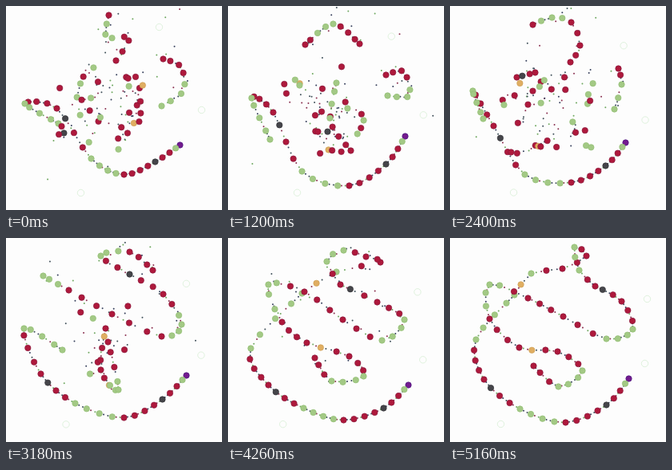
These frames come from a looping animation (270x256 px, 5.22 s). An HTML page with a canvas:

```html
<!DOCTYPE html>
<html lang="en">
<head>
<meta charset="utf-8">
<title>Folding chain</title>
<style>
html, body { margin: 0; width: 100%; height: 100%; overflow: hidden; background: #fdfdfd; }
canvas { display: block; }
</style>
</head>
<body>
<canvas width="270" height="256"></canvas>
<script>
const ctx = document.querySelector('canvas').getContext('2d');
const LOOP = 5220, STEP = 60, FOLDED = 5160;
const KINDS = 'pgrrdrrrrggggrrdrrrrgggggogrrrrrgggrrdrrrrggggrrrrrrrggggrrrrorrrrggggrrr';
const FILL = { p: '#731b8e', g: '#a3c985', r: '#ae193c', d: '#45454a', o: '#e0ae62' };
const EDGE = { p: '#4c1a80', g: '#93bf74', r: '#8a1b3e', d: '#35353a', o: '#cfa055' };
const DOTS = ['#37405c', '#6fa860', '#8a3050', '#40505a'];
const poses = [];

const mix = (a, b, u) => a + (b - a) * u;
const hash = n => { const s = Math.sin(n * 127.1 + 3.7) * 43758.5453; return s - Math.floor(s); };

function spline(a, b, c, d, u) {
  return b + u * (c - a + u * (2 * a - 5 * b + 4 * c - d + u * (3 * (b - c) + d - a))) / 2;
}

// A strand is [first bead, last bead, x, y, x, y, ...]: beads spread along a curve through key points.
// Beads that belong to no strand float loose near the middle.
function pose(time, ...strands) {
  const beads = [...KINDS].map((_, i) => {
    const seed = i + time;
    return [65 + 115 * hash(seed), 75 + 110 * hash(seed + 0.5)];
  });
  for (const [first, last, ...xy] of strands) {
    const end = xy.length / 2 - 1;
    for (let i = first; i <= last; i++) {
      const s = (i - first) / (last - first) * end, k = Math.min(Math.floor(s), end - 1);
      beads[i] = [0, 1].map(axis => {
        const at = j => xy[2 * Math.max(0, Math.min(end, j)) + axis];
        return spline(at(k - 1), at(k), at(k + 1), at(k + 2), s - k);
      });
    }
  }
  poses.push({ time, beads });
}

pose(0,
  [0, 24, 217,174, 186,195, 147,211, 106,191, 63,128, 23,122, 65,147],
  [28, 35, 137,68, 153,40, 125,38, 128,11],
  [38, 45, 196,66, 218,76, 221,106, 194,125]);

pose(1200,
  [0, 24, 221,163, 197,198, 151,225, 92,207, 56,133, 29,115, 52,167],
  [28, 36, 164,47, 131,22, 96,48],
  [38, 45, 197,86, 219,82, 226,112, 199,112],
  [48, 55, 153,181, 128,145, 135,96]);

pose(2400,
  [0, 24, 219,171, 194,200, 151,221, 93,211, 54,150, 28,106, 41,141],
  [27, 35, 150,70, 162,49, 151,20, 127,14, 103,23],
  [36, 39, 83,89, 106,83],
  [40, 44, 210,78, 214,98, 205,129]);

pose(3180,
  [0, 24, 225,172, 195,202, 147,225, 86,207, 43,170, 22,113, 70,140],
  [28, 55, 183,40, 154,17, 118,22, 154,45, 196,70, 219,108, 194,123, 132,95, 78,65, 46,47],
  [60, 72, 124,113, 118,165, 140,190, 127,130]);

pose(4260,
  [0, 24, 225,184, 194,213, 144,228, 94,213, 50,184, 28,138, 92,69],
  [24, 36, 92,69, 135,42, 190,30, 172,23, 144,15, 123,29, 140,58],
  [36, 72, 140,58, 186,80, 220,102, 192,128, 143,102, 95,67, 50,58,
    67,105, 98,131, 151,148, 169,173, 129,179, 108,150]);

pose(FOLDED,
  [0, 24, 223,176, 195,209, 144,231, 87,214, 42,177, 32,127, 80,71],
  [24, 36, 80,71, 101,44, 140,38, 170,22, 155,11, 161,40, 181,60],
  [36, 72, 181,60, 214,79, 228,114, 195,126, 141,98, 97,75, 49,58,
    49,101, 86,137, 134,142, 165,166, 135,186, 104,160]);

function disc(x, y, r, fill, edge) {
  ctx.beginPath();
  ctx.arc(x, y, r, 0, 7);
  if (fill) { ctx.fillStyle = fill; ctx.fill(); }
  if (edge) { ctx.strokeStyle = edge; ctx.stroke(); }
}

function draw(t) {
  const next = poses.findIndex(p => p.time > t);
  const k = next < 0 ? poses.length - 2 : next - 1;
  const a = poses[k], b = poses[k + 1];
  const u = Math.min(1, (t - a.time) / (b.time - a.time));
  const beads = a.beads.map(([x, y], i) => [mix(x, b.beads[i][0], u), mix(y, b.beads[i][1], u)]);
  const done = t / FOLDED;

  ctx.setTransform(1, 0, 0, 1, 0, 0);
  ctx.fillStyle = '#fdfdfd';
  ctx.fillRect(0, 0, 270, 256);
  ctx.translate(0.5, 0.5);
  ctx.lineWidth = 0.7;
  disc(mix(191, 246, done), mix(26, 76, done), 4.2, null, '#d3ecd0');
  disc(mix(244, 243, done), mix(130, 157, done), 4.2, null, '#d3ecd0');
  disc(mix(93, 63, done), mix(234, 233, done), 4.2, null, '#d3ecd0');

  // Linker dots drift far from the loose half and settle as the chain folds.
  for (let i = 0; i < beads.length - 1; i++) {
    const [x, y] = beads[i], [nx, ny] = beads[i + 1];
    for (let j = 1; j < 3; j++) {
      const n = i * 2 + j, angle = hash(n) * 6.283;
      const drift = i > 23 ? 90 * (1 - done) * hash(n + 500) ** 5 : 0;
      disc(mix(x, nx, j / 3) + drift * Math.cos(angle), mix(y, ny, j / 3) + drift * Math.sin(angle), 1, DOTS[n % 4]);
    }
  }
  beads.forEach(([x, y], i) => disc(x, y, 3.7, FILL[KINDS[i]], EDGE[KINDS[i]]));
}

const start = performance.now();
function tick() {
  const t = (performance.now() - start) % LOOP;
  draw(Math.floor(t / STEP) * STEP);
  requestAnimationFrame(tick);
}
tick();
</script>
</body>
</html>
```
